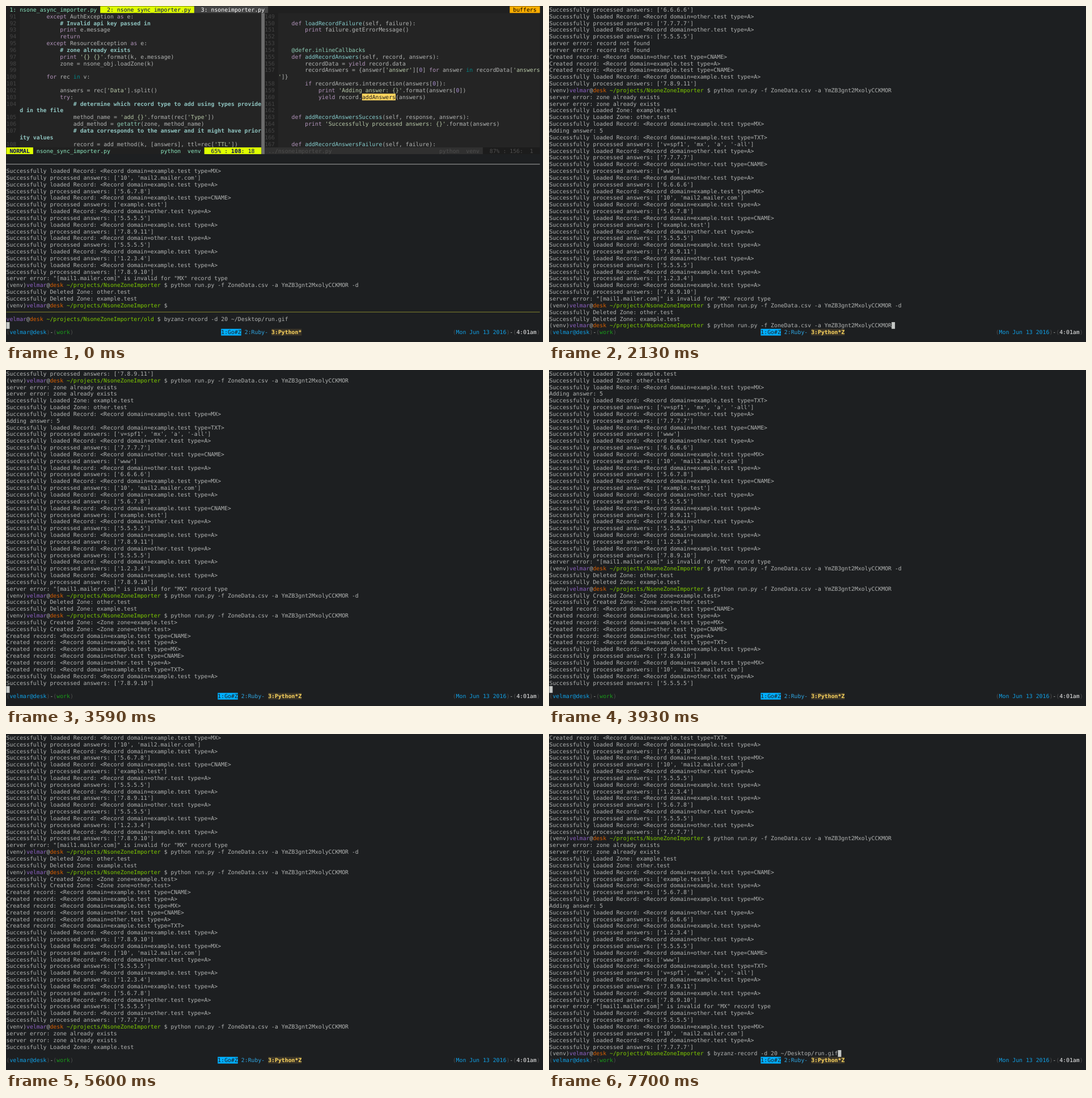
Animation, 947 px wide and 592 px high, one loop 8000 ms. Source, as an HTML page:

```html
<!DOCTYPE html>
<html lang="en">
<head>
<meta charset="utf-8">
<title>Terminal session</title>
<style>
html, body { margin: 0; width: 100%; height: 100%; overflow: hidden; background: #1d1f21; }
svg { position: fixed; inset: 0; width: 100%; height: 100%; }
text {
  font: 19.932px "DejaVu Sans Mono", monospace;
  white-space: pre;
  text-rendering: geometricPrecision;
}
.bold { font-weight: bold; }
</style>
</head>
<body>
<svg viewBox="0 0 1920 1200" preserveAspectRatio="none">
  <g id="stage" transform="translate(1 1)"></g>
</svg>
<script>
const CELL_W = 12, CELL_H = 24, LOOP = 8000;
const USER = 'velmar', HOST = 'desk';
const FG = '#b2b4b3', CURSOR = '#c5c8c6', BG = '#1d1f21', DIM = '#4e4e4e', BLUE = '#00afff';
const LIME = '#dfff00', MINT = '#8ae6bf', NAVY = '#00005f', OLIVE = '#87872f';

const stage = document.getElementById('stage');

function add(parent, tag, attrs, content) {
  const node = document.createElementNS('http://www.w3.org/2000/svg', tag);
  for (const key in attrs) node.setAttribute(key, attrs[key]);
  if (content) node.textContent = content;
  parent.append(node);
  return node;
}

const group = (parent = stage) => add(parent, 'g', {});

function box(parent, row, col, cols, fill, rows = 1) {
  return add(parent, 'rect', {
    x: col * CELL_W, y: row * CELL_H, width: cols * CELL_W, height: rows * CELL_H, fill
  });
}

function put(parent, row, col, text, fill = FG, bold = false) {
  if (!text.trim()) return;
  const attrs = { x: col * CELL_W, y: row * CELL_H + 19, fill };
  if (bold) attrs.class = 'bold';
  add(parent, 'text', attrs, text);
}

// Writes [text, colour, bold] pieces one after another.
function run(parent, row, col, pieces) {
  for (const [text, fill, bold] of pieces) {
    put(parent, row, col, text, fill, bold);
    col += text.length;
  }
}

/* ---- editor ---- */

const SYNTAX = /(?<comment>#.*)|(?<string>'[^']*')|(?<name>(?<=def )\w+)|(?<keyword>\b(?:def|except|as|print|return|for|try|yield|if)\b)|(?<op>\bin\b)|(?<builtin>\bgetattr\b|@[\w.]+)|(?<hit>\baddAnswers\b)|(?<number>\b\d+\b)|(?<plain>\w+|[^\w#'@]+)/g;
const INK = {
  comment: '#8fc4c0', string: '#b8c9a8', name: '#87cfcf', keyword: '#b294bb', op: '#008787',
  builtin: '#8fd0b8', hit: '#1c1c1c', number: '#a98fd0', plain: FG
};

const LEFT_CODE = `        except AuthException as e:
            # Invalid api key passed in
            print e.message
            return
        except ResourceException as e:
            # zone already exists
            print '{} {}'.format(k, e.message)
            zone = nsone_obj.loadZone(k)

        for rec in v:

            answers = rec['Data'].split()
            try:
                # determine which record type to add using types provided in the file
                method_name = 'add_{}'.format(rec['Type'])
                add_method = getattr(zone, method_name)
                # data corresponds to the answer and it might have priority values
                record = add_method(k, [answers], ttl=rec['TTL'])`;

const RIGHT_CODE = `
    def loadRecordFailure(self, failure):
        print failure.getErrorMessage()


    @defer.inlineCallbacks
    def addRecordAnswers(self, record, answers):
        recordData = yield record.data
        recordAnswers = {answer['answer'][0] for answer in recordData['answers']}
        if recordAnswers.intersection(answers[0]):
            print 'Adding answer: {}'.format(answers[0])
            yield record.addAnswers(answers)


    def addRecordAnswersSuccess(self, response, answers):
        print 'Successfully processed answers: {}'.format(answers)


    def addRecordAnswersFailure(self, failure):`;

function drawCode(parent, code, firstLine, col, width) {
  let row = 1;
  code.split('\n').forEach((line, i) => {
    put(parent, row, col, String(firstLine + i).padStart(3), '#444444');
    let pos = 0;
    for (const match of line.matchAll(SYNTAX)) {
      const kind = Object.keys(INK).find(key => match.groups[key] !== undefined);
      let text = match[0];
      while (text) {
        const r = row + Math.floor(pos / width), c = pos % width;
        const part = text.slice(0, width - c);
        if (kind === 'hit') box(parent, r, col + 4 + c, part.length, '#ffd75f');
        put(parent, r, col + 4 + c, part, INK[kind], kind === 'comment');
        pos += part.length;
        text = text.slice(part.length);
      }
    }
    row += Math.max(1, Math.ceil(line.length / width));
  });
}

function drawEditor(parent) {
  box(parent, 0, 0, 159, '#202020');
  box(parent, 1, 0, 159, '#242424', 21);
  box(parent, 1, 0, 4, '#1f1f1f', 20);
  box(parent, 1, 77, 4, '#1f1f1f', 20);
  box(parent, 1, 76, 1, '#6c6c6c', 21);

  put(parent, 0, 1, '1: nsone_async_importer.py', MINT);
  box(parent, 0, 28, 28, LIME);
  put(parent, 0, 30, '2: nsone_sync_importer.py', NAVY);
  box(parent, 0, 56, 22, '#444444');
  put(parent, 0, 58, '3: nsoneimporter.py', '#ffffff');
  box(parent, 0, 150, 9, '#ffaf00');
  put(parent, 0, 151, 'buffers', '#000000');

  drawCode(parent, LEFT_CODE, 91, 0, 72);
  drawCode(parent, RIGHT_CODE, 149, 77, 78);

  box(parent, 21, 0, 76, '#202020');
  box(parent, 21, 0, 8, LIME);
  put(parent, 21, 1, 'NORMAL', NAVY, true);
  put(parent, 21, 9, 'nsone_sync_importer.py', MINT);
  put(parent, 21, 46, 'python  venv', MINT);
  box(parent, 21, 59, 17, LIME);
  run(parent, 21, 61, [['65% : ', NAVY], ['108', NAVY, true], [': 18', NAVY]]);

  box(parent, 21, 77, 65, '#303030');
  box(parent, 21, 142, 17, '#1c1c1c');
  put(parent, 21, 78, '../nsoneimporter.py', DIM);
  put(parent, 21, 129, 'python  venv', DIM);
  put(parent, 21, 144, '87% : 156:  1', DIM);
}

/* ---- shell ---- */

const IMPORT = 'python run.py -f ZoneData.csv -a YmZB3gnt2MxolyCCKMOR';
const RECORD = 'byzanz-record -d 20 ~/Desktop/run.gif';
const DIR = '~/projects/NsoneZoneImporter';
const PROMPT_COLS = `(venv)${USER}@${HOST} ${DIR} $ `.length;

const prompt = (venv, dir, command) => [
  [venv, FG], [USER, '#8f62c4'], ['@', FG], [HOST, '#d75f00'],
  [' ' + dir, '#7fcb00'], [' $ ' + command, FG]
];

// "+" loads a record and prints its answers, "*" creates one, "$" is a prompt.
const LOG = `='6.6.6.6'
+o A '7.7.7.7'
+o A '5.5.5.5'
server error: record not found
server error: record not found
*o CNAME
*e A
*e CNAME
+e A '7.8.9.11'
$
server error: zone already exists
server error: zone already exists
Successfully Loaded Zone: example.test
Successfully Loaded Zone: other.test
+e MX
Adding answer: 5
+e TXT 'v=spf1', 'mx', 'a', '-all'
+o A '7.7.7.7'
+o CNAME 'www'
+o A '6.6.6.6'
+e MX '10', 'mail2.mailer.com'
+e A '5.6.7.8'
+e CNAME 'example.test'
+o A '5.5.5.5'
+e A '7.8.9.11'
+o A '5.5.5.5'
+e A '1.2.3.4'
+e A '7.8.9.10'
server error: "[mail1.mailer.com]" is invalid for "MX" record type
$ -d
Successfully Deleted Zone: other.test
Successfully Deleted Zone: example.test
$
Successfully Created Zone: <Zone zone=example.test>
Successfully Created Zone: <Zone zone=other.test>
*e CNAME
*e A
*e MX
*o CNAME
*o A
*e TXT
+e A '7.8.9.10'
+e MX '10', 'mail2.mailer.com'
+o A '5.5.5.5'
+e A '1.2.3.4'
+e A '5.6.7.8'
+o A '5.5.5.5'
+o A '7.7.7.7'
$
server error: zone already exists
server error: zone already exists
Successfully Loaded Zone: example.test
Successfully Loaded Zone: other.test
+e CNAME 'example.test'
+e A '5.6.7.8'
+e MX
Adding answer: 5
+o A '6.6.6.6'
+e A '1.2.3.4'
+o A '5.5.5.5'
+o CNAME 'www'
+e TXT 'v=spf1', 'mx', 'a', '-all'
+e A '7.8.9.11'
+e A '7.8.9.10'
server error: "[mail1.mailer.com]" is invalid for "MX" record type
+o A '5.5.5.5'
+e MX '10', 'mail2.mailer.com'
+o A '7.7.7.7'`;

const plain = text => [[text, FG]];
const answers = list => plain(`Successfully processed answers: [${list}]`);

function expand(line) {
  if (line[0] === '$') return [prompt('(venv)', DIR, IMPORT + line.slice(1))];
  if (line[0] === '=') return [answers(line.slice(1))];
  const match = line.match(/^([+*])([eo]) (\w+) ?(.*)$/);
  if (!match) return [plain(line)];
  const [, mark, zone, type, list] = match;
  const record = `<Record domain=${zone === 'e' ? 'example' : 'other'}.test type=${type}>`;
  const head = mark === '+' ? 'Successfully loaded Record: ' : 'Created record: ';
  const lines = [plain(head + record)];
  if (list) lines.push(answers(list));
  return lines;
}

const history = LOG.split('\n').flatMap(expand);

function drawShell(parent, top, bottom, count, command, cursor) {
  const rows = bottom - top;
  history.slice(count - rows, count).forEach((line, i) => run(parent, top + i, 0, line));
  if (command !== null) run(parent, bottom, 0, prompt('(venv)', DIR, command));
  if (cursor) box(parent, bottom, command === null ? 0 : PROMPT_COLS + command.length, 1, CURSOR);
}

/* ---- status bar ---- */

function drawStatus(parent, zoomed) {
  const start = zoomed ? 63 : 64;
  const current = zoomed ? '3:Python*Z' : '3:Python*';
  run(parent, 48, 0, [['(', DIM], [`${USER}@${HOST}`, '#10a0e6'], [')', DIM], ['-', FG], ['(', DIM],
    ['work', '#1a9a1a'], [')', DIM]]);
  box(parent, 48, start, 6, BLUE);
  put(parent, 48, start, '1:Go#Z', BG);
  put(parent, 48, start + 7, '2:Ruby-', '#2fa4e0');
  box(parent, 48, start + 15, current.length, '#3a3428');
  put(parent, 48, start + 15, current, '#ffd75f', true);
  run(parent, 48, 133, [['(', DIM], ['Mon Jun 13 2016', '#10a0e6'], [')', DIM], ['-', FG], ['(', DIM],
    ['4:01am', '#f0f0f0'], [')', DIM]]);
}

/* ---- scenes ---- */

function border(parent, row, fill) {
  add(parent, 'rect', { x: 0, y: row * CELL_H + 11, width: 159 * CELL_W, height: 2, fill });
}

const split = group(), zoom = group();
drawEditor(split);
border(split, 45, OLIVE);
run(split, 46, 0, prompt('', DIR + '/old', RECORD));
drawStatus(split, false);
drawStatus(zoom, true);
const splitLive = group(split), zoomLive = group(zoom);

// time, finished lines, command being typed (null while a program runs), cursor shown
const STEPS = [
  [0, 47, '', false], [440, 47, '', true], [840, 47, '', true],
  [1340, 47, IMPORT + ' -d', true], [1820, 47, IMPORT + ' -', true],
  [1970, 47, IMPORT + ' ', true], [2130, 47, IMPORT, true],
  [2460, 48, null, true], [2920, 49, null, false], [3000, 50, null, true],
  [3200, 51, null, true], [3450, 54, null, false], [3520, 56, null, false],
  [3590, 58, null, true], [3760, 60, null, false], [3850, 62, null, true],
  [3940, 64, null, false], [4030, 66, null, false], [4120, 68, null, true],
  [4210, 70, '', true], [4680, 70, IMPORT, true],
  [4880, 71, null, true], [5400, 72, null, false], [5500, 73, null, true],
  [5600, 74, null, false], [5800, 75, null, false], [6030, 75, null, true],
  [6440, 81, null, true], [6530, 87, null, true], [6630, 95, null, false],
  [6810, 102, null, false], [6970, 102, '', false], [7180, 102, '', true],
  [7420, 102, IMPORT, true], [7700, 102, RECORD, true]
];

let shown = null;

function draw(time) {
  const step = STEPS.findLast(s => s[0] <= time);
  if (step === shown) return;
  shown = step;
  const [at, count, command, cursor] = step;
  const zoomed = at >= 840;
  split.style.display = zoomed ? 'none' : '';
  zoom.style.display = zoomed ? '' : 'none';
  const live = zoomed ? zoomLive : splitLive;
  live.replaceChildren();
  if (zoomed) {
    drawShell(live, 0, 47, count, command, cursor);
  } else {
    drawShell(live, 24, 44, count, command, cursor);
    border(live, 23, cursor ? OLIVE : '#a8a8a8');
    if (!cursor) box(live, 47, 0, 1, CURSOR);
  }
}

const begin = performance.now();
function tick() {
  draw((performance.now() - begin) % LOOP);
  requestAnimationFrame(tick);
}
tick();
</script>
</body>
</html>
```
